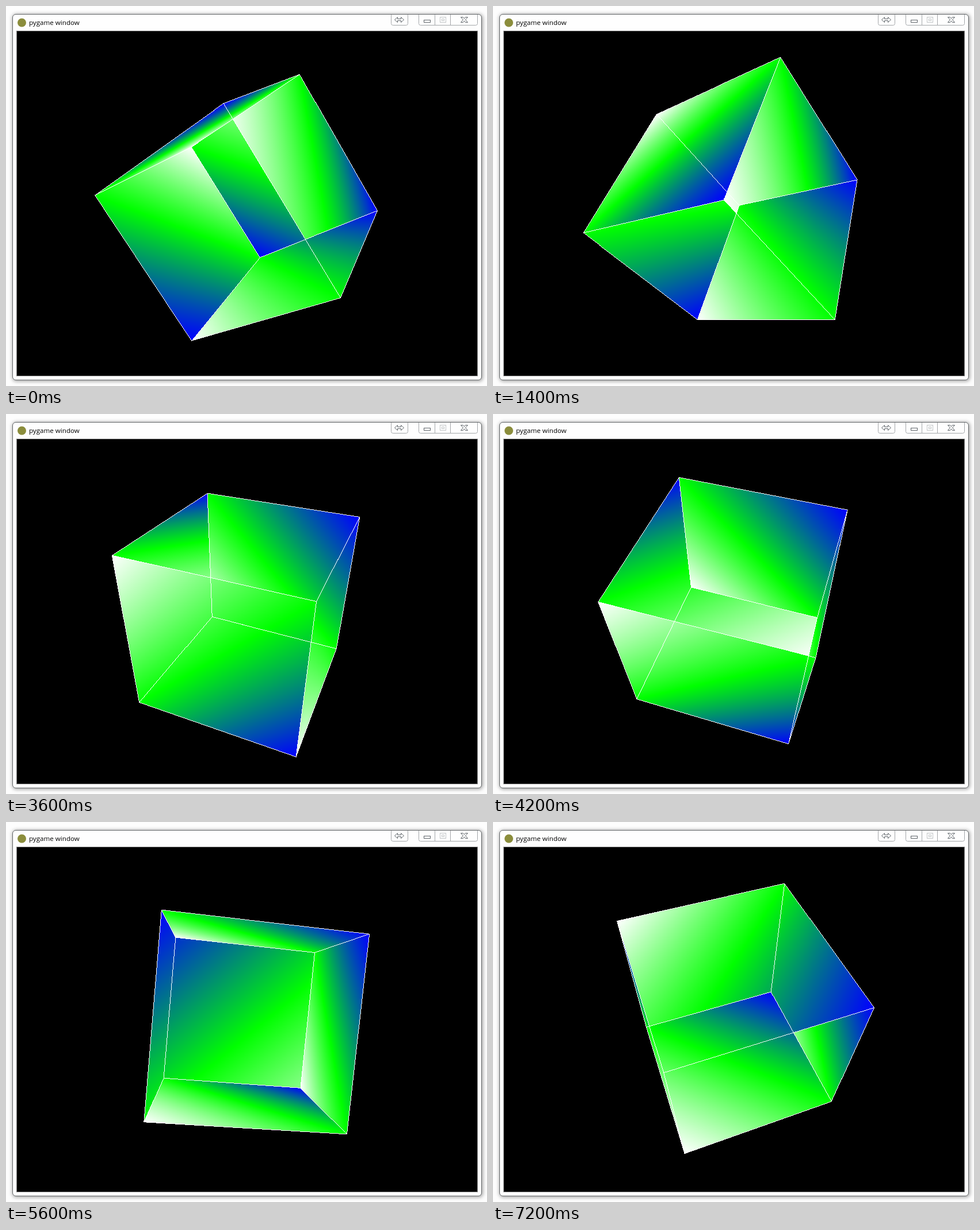
Write an HTML page with a canvas that moves like this. It is 836 px wide and 662 px high and loops after 7.4 s.

```html
<!DOCTYPE html>
<html lang="en">
<head>
<meta charset="utf-8">
<title>pygame window</title>
<style>
html, body { margin: 0; width: 100%; height: 100%; overflow: hidden; background: #fdfdfd; }
#stage { position: relative; width: 836px; height: 662px; overflow: hidden; }
#frame {
  position: absolute; left: 11px; top: 14px; width: 814px; height: 636px;
  border: 1px solid #626668; border-radius: 6px; background: #fefefe;
  box-shadow: 1px 1px 6px 1px rgba(0, 0, 0, .36);
}
#view { position: absolute; left: 19px; top: 44px; outline: 1px solid #858585; background: #000; }
svg { position: absolute; left: 0; top: 0; }
text { font: 11.6px "Open Sans", "Noto Sans", sans-serif; fill: #000; }
</style>
</head>
<body>
<div id="stage">
  <div id="frame"></div>
  <canvas id="view" width="800" height="600"></canvas>
  <svg width="836" height="662">
    <circle cx="27.5" cy="29" r="7.5" fill="#8b8d3c"/>
    <text x="40" y="33">pygame window</text>
    <g fill="none" stroke="#a3a6a9">
      <path d="M669.5 15V30.5q0 3 3 3H695.5q3 0 3-3V15"/>
      <path d="M717.5 15V30.5q0 3 3 3H816.5q3 0 3-3V15M745.5 15V33M772.5 15V33"/>
    </g>
    <g fill="#fff" stroke="#5d6368">
      <path d="M675.5 24l5-4.5v3h6v-3l5 4.5l-5 4.5v-3h-6v3z"/>
      <rect x="726.5" y="24.5" width="11" height="4"/>
      <g stroke="#c2c5c7">
        <rect x="754.5" y="19.5" width="10" height="9"/>
        <rect x="757.5" y="22.5" width="4" height="3"/>
      </g>
      <path d="M790.5 19.5h4l2 2.5l2-2.5h4l-4 4.5l4 4.5h-4l-2-2.5l-2 2.5h-4l4-4.5z"/>
    </g>
  </svg>
</div>
<script>
const W = 800, H = 600, CX = 399.7, CY = 299.8;
const FOCAL = 300 / Math.tan(Math.PI / 8), DIST = 5;
const STEP = 200, LOOP = 7400;

const vertices = [
  [1, -1, -1], [1, 1, -1], [-1, 1, -1], [-1, -1, -1],
  [1, -1, 1], [1, 1, 1], [-1, -1, 1], [-1, 1, 1]
];
const edges = [
  [0, 1], [0, 3], [0, 4], [2, 1], [2, 3], [2, 7],
  [6, 3], [6, 4], [6, 7], [5, 1], [5, 4], [5, 7]
];
// Drawn in this order with no depth test.
const faces = [
  [0, 1, 2, 3], [3, 2, 7, 6], [6, 7, 5, 4],
  [4, 5, 1, 0], [1, 5, 7, 2], [4, 0, 3, 6]
];
const BLUE = [0, 0, 255], WHITE = [255, 255, 255];
// [step, degrees turned]
const turns = [[0, 172], [7, 201], [12, 237], [18, 277], [24, 314], [28, 340], [36, 393]];

const ctx = document.getElementById('view').getContext('2d');
const image = ctx.createImageData(W, H);
const px = image.data;

function rotate([x, y, z], deg, axis) {
  const len = Math.hypot(...axis), [a, b, c] = axis.map(v => v / len);
  const r = deg * Math.PI / 180, cos = Math.cos(r), sin = Math.sin(r);
  const k = (a * x + b * y + c * z) * (1 - cos);
  return [
    x * cos + (b * z - c * y) * sin + a * k,
    y * cos + (c * x - a * z) * sin + b * k,
    z * cos + (a * y - b * x) * sin + c * k
  ];
}

function project(v, deg) {
  const [x, y, z] = rotate(rotate(v, deg, [3, 1, 1]), 25, [2, 1, 0]);
  const q = 1 / (DIST - z);
  return { x: CX + FOCAL * x * q, y: CY - FOCAL * y * q, q };
}

function plot(x, y, r, g, b) {
  const i = (y * W + x) * 4;
  px[i] = r; px[i + 1] = g; px[i + 2] = b;
}

const side = (a, b, x, y) => (b.x - a.x) * (y - a.y) - (b.y - a.y) * (x - a.x);

// Green at a and b, the given colour at tip, perspective-correct blend.
function triangle(a, b, tip, [red, green, blue]) {
  const area = side(a, b, tip.x, tip.y);
  if (Math.abs(area) < 1e-6) return;
  const xs = [a.x, b.x, tip.x], ys = [a.y, b.y, tip.y];
  const x0 = Math.ceil(Math.min(...xs)), x1 = Math.floor(Math.max(...xs));
  const y0 = Math.ceil(Math.min(...ys)), y1 = Math.floor(Math.max(...ys));
  for (let y = y0; y <= y1; y++) {
    for (let x = x0; x <= x1; x++) {
      const wt = side(a, b, x, y) / area;
      const wa = side(b, tip, x, y) / area;
      const wb = 1 - wt - wa;
      if (wt < 0 || wa < 0 || wb < 0) continue;
      const t = wt * tip.q / (wt * tip.q + wa * a.q + wb * b.q);
      plot(x, y, red * t, 255 + (green - 255) * t, blue * t);
    }
  }
}

function line(a, b) {
  const dx = b.x - a.x, dy = b.y - a.y;
  const n = Math.ceil(Math.max(Math.abs(dx), Math.abs(dy)));
  for (let i = 0; i <= n; i++) {
    plot(Math.round(a.x + dx * i / n), Math.round(a.y + dy * i / n), ...WHITE);
  }
}

function angleAt(step) {
  const k = turns.findIndex(([s]) => s >= step);
  if (k < 1) return turns[0][1];
  const [s0, d0] = turns[k - 1], [s1, d1] = turns[k];
  return Math.round(d0 + (d1 - d0) * (step - s0) / (s1 - s0));
}

function draw(step) {
  const deg = angleAt(step), pts = vertices.map(v => project(v, deg));
  for (let i = 0; i < px.length; i += 4) {
    px[i] = px[i + 1] = px[i + 2] = 0;
    px[i + 3] = 255;
  }
  for (const face of faces) {
    const [a, b, c, d] = face.map(i => pts[i]);
    triangle(a, c, b, BLUE);
    triangle(a, c, d, WHITE);
  }
  for (const [a, b] of edges) line(pts[a], pts[b]);
  ctx.putImageData(image, 0, 0);
}

let shown = -1;
function tick() {
  const step = Math.floor(performance.now() % LOOP / STEP);
  if (step !== shown) draw(shown = step);
  requestAnimationFrame(tick);
}
tick();
</script>
</body>
</html>
```
